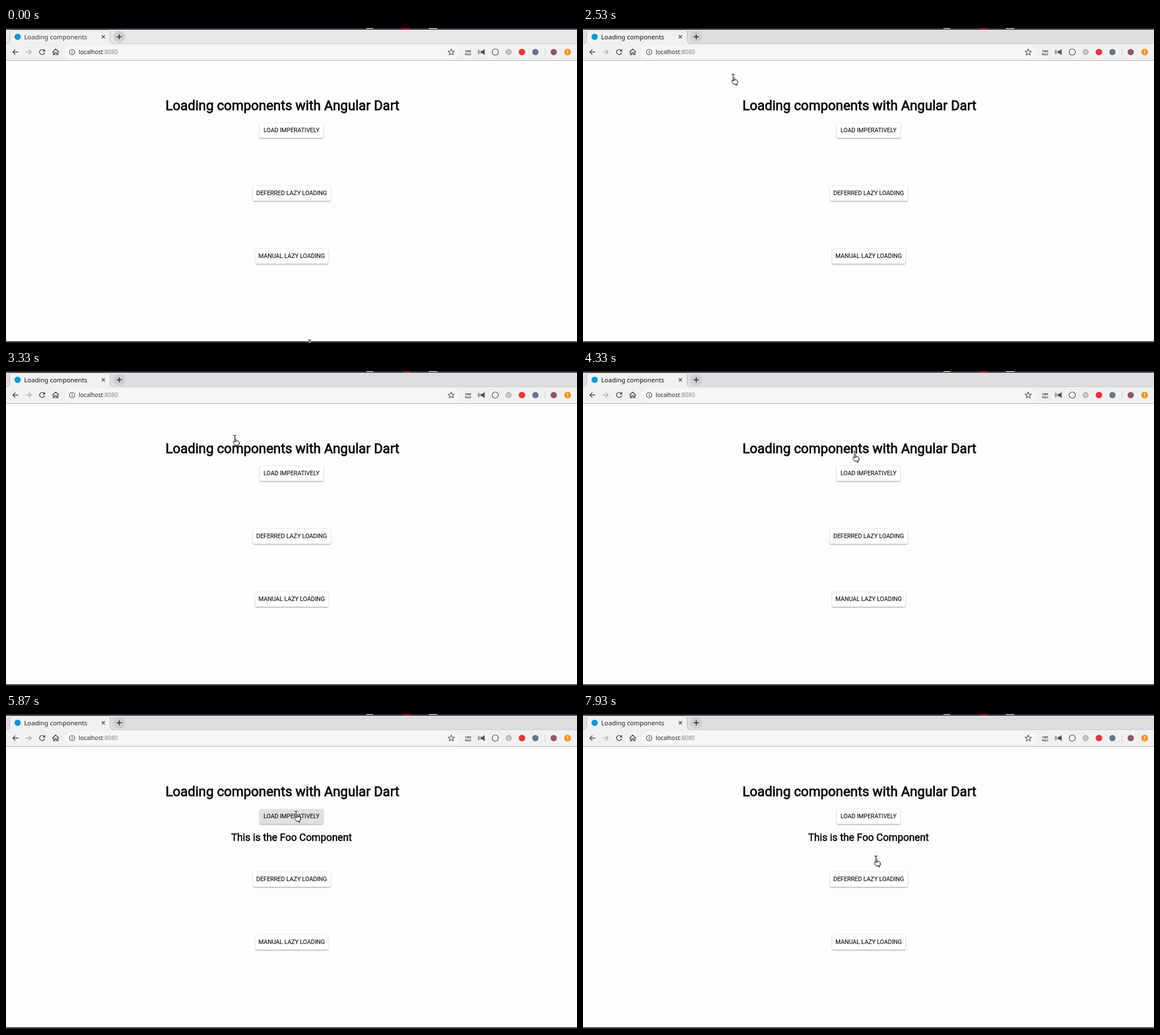
An HTML page that plays this animation: 1006 px wide and 556 px high, repeating every 8 s.

```html
<!DOCTYPE html>
<html lang="en">
<head>
<meta charset="utf-8">
<title>Loading components</title>
<style>
  html, body { margin: 0; width: 100%; height: 100%; overflow: hidden; background: #fdfdfc; }
  .stage { position: relative; width: 1006px; height: 556px; overflow: hidden; background: #fdfdfc; }
  svg { position: absolute; left: 0; top: 0; overflow: visible; }
  .ui { font-family: "Noto Sans", "Open Sans", sans-serif; }
  .line { fill: none; stroke: #4a4a4d; stroke-width: 1.4; }

  h1, h2 {
    position: absolute; left: 0; width: 1006px; margin: 0; text-align: center; white-space: nowrap;
    font-family: Roboto, sans-serif; font-weight: 400; color: #0b0b0b;
    -webkit-text-stroke: .8px #0b0b0b;
  }
  h1 { left: -16px; top: 123px; font-size: 23.76px; line-height: 28px; }
  h2 { top: 207px; font-size: 17.82px; line-height: 22px; -webkit-text-stroke-width: .6px; }

  .button {
    position: absolute; height: 26px; line-height: 26.5px; border-radius: 2px;
    text-align: center; white-space: nowrap; background: #fff; color: #141414;
    font: 400 10.5px/26.5px Roboto, sans-serif; -webkit-text-stroke: .15px #141414;
    box-shadow: 0 1.5px 2px rgba(0,0,0,.28), 0 0 2px rgba(70,70,130,.24);
  }

  .strip, .title, .load, .foo, .cursor, .cursor g { animation: 8s linear infinite; }
  .strip { animation-name: strip; }
  .title { animation-name: title; }
  .load { animation-name: press; }
  .foo { animation-name: appear; animation-timing-function: step-end; }
  .cursor { animation-name: travel; }
  .cursor g { animation-timing-function: step-end; }
  .arrow { animation-name: arrow; }
  .hand { animation-name: hand; }
  .beam { animation-name: beam; }

  @keyframes strip { 0%, 1.6% { fill: #e8e6e8; } 5.9%, 100% { fill: #dfdddf; } }
  @keyframes title { 0%, 1.6% { fill: #3a3a3a; } 5.9%, 53.3% { fill: #101010; } 61.6%, 100% { fill: #222; } }

  @keyframes press {
    0%, 59.4% { background: #fff; }
    60.5%, 64.1% { background: #e0e0e0; box-shadow: 0 1.5px 2px rgba(0,0,0,.28), 0 0 2px rgba(70,70,130,.24); }
    66.2%, 68.3% { background: #b9b9b9; box-shadow: 0 3px 5px rgba(0,0,0,.34), 0 1px 3px rgba(0,0,0,.2); }
    70.9%, 76.9% { background: #e0e0e0; box-shadow: 0 1.5px 2px rgba(0,0,0,.28), 0 0 2px rgba(70,70,130,.24); }
    78%, 100% { background: #fff; }
  }
  @keyframes appear { 0% { opacity: 0; } 68.4%, 100% { opacity: 1; } }

  @keyframes travel {
    0%, 1.6% { transform: translate(535px, 556px); }
    5.9%, 10.9% { transform: translate(485px, 380px); }
    15.9%, 19.1% { transform: translate(427px, 131px); }
    20% { transform: translate(440px, 132px); }
    25.9%, 30.8% { transform: translate(262px, 86px); }
    31.6% { transform: translate(264px, 87px); }
    41.6%, 42.5% { transform: translate(403px, 119px); }
    52.5%, 53.4% { transform: translate(475px, 144px); }
    61.6%, 73.4% { transform: translate(511px, 177px); }
    82.5%, 84.1% { transform: translate(492px, 222px); }
    93.4%, 95% { transform: translate(501px, 221px); }
    99.1%, 100% { transform: translate(516px, 256px); }
  }
  @keyframes arrow {
    0% { opacity: 0; } 1.63% { opacity: 1; } 44.5% { opacity: 0; }
    55.4% { opacity: 1; } 59.4% { opacity: 0; }
    77% { opacity: 1; } 79.8% { opacity: 0; } 96.3%, 100% { opacity: 1; }
  }
  @keyframes hand { 0% { opacity: 0; } 59.4% { opacity: 1; } 77%, 100% { opacity: 0; } }
  @keyframes beam {
    0% { opacity: 0; } 44.5% { opacity: 1; } 55.4% { opacity: 0; }
    79.8% { opacity: 1; } 96.3%, 100% { opacity: 0; }
  }
</style>
</head>
<body>
<div class="stage">
  <svg class="ui" width="1006" height="556">
    <!-- desktop edges -->
    <path d="M0 0H1006V3H0zM0 553H1006V556H0z" fill="#302d38"/>
    <path d="M635 0h12v1.5h-12zM745 0h15v1.5h-15z" fill="#d5d4d8"/>
    <path d="M699 0h13v2h-13z" fill="#c5103c"/>

    <!-- tab strip and toolbar -->
    <rect class="strip" y="3" width="1006" height="25"/>
    <rect y="27.5" width="1006" height="30" fill="#f1f0f1"/>
    <path d="M0 27.5H1006" stroke="#c6c4c6"/>
    <path d="M0 57.5H1006" stroke="#b9b7b9"/>
    <path d="M0 28.5Q6.500 27.500 6.500 22V8Q6.500 3.500 11 3.500H178.500Q183.500 3.500 183.500 8V22Q183.500 27.500 190 28.500z" fill="#f1f0f1"/>
    <path d="M0 27.500Q6.500 27.500 6.500 22V8Q6.500 3.500 11 3.500H178.500Q183.500 3.500 183.500 8V22Q183.500 27.500 190 27.500" fill="none" stroke="#bcbabc"/>
    <circle cx="20.500" cy="15.500" r="5.500" fill="#1296d0"/>
    <text class="title" x="32" y="19.700" font-size="11.200">Loading components</text>
    <path class="line" d="M168.800 12.800l5.400 5.400m0-5.400l-5.400 5.400"/>
    <circle cx="199.500" cy="15.500" r="10.300" fill="#d0cdd0"/>
    <path class="line" d="M195 15.500h9m-4.500-4.500v9" style="stroke:#222"/>

    <!-- navigation -->
    <rect x="103" y="31" width="695" height="23" rx="11.500" fill="#f7f6f7"/>
    <path class="line" d="M21.500 42.500H12m4.500-4.500L12 42.500l4.500 4.500"/>
    <path class="line" d="M35 42.500h9.500m-4.500-4.500l4.500 4.500l-4.500 4.500" style="stroke:#b0aeb0"/>
    <path class="line" d="M67.500 40A4.500 4.500 0 1 0 68 43.500"/>
    <path d="M69 36.800v4.700h-4.700z" fill="#4a4a4d"/>
    <path class="line" d="M81.800 42.500L87.500 37.300L93.200 42.500M83.500 41.500V47H86V43.500H89V47H91.500V41.500"/>
    <circle class="line" cx="116.500" cy="42.500" r="4.700" style="stroke-width:1.100"/>
    <path class="line" d="M116.500 41.800v3.200m0-5.400v1.200" style="stroke-width:1.200"/>
    <text x="128" y="46" font-size="10.200" fill="#262626">localhost<tspan fill="#808084">:8080</tspan></text>

    <!-- extensions -->
    <path class="line" style="stroke-width:1.100" d="M784.500 37.200l1.500 3.600l3.900.3l-3 2.500l1 3.800l-3.400-2.100l-3.400 2.100l1-3.800l-3-2.500l3.900-.3z"/>
    <g font-size="4.800" font-weight="700" text-anchor="middle" fill="#444">
      <text x="814" y="42.500">1480</text><text x="814" y="48">days</text>
    </g>
    <path d="M836.500 40.300h2.800l4-3.300v11l-4-3.300h-2.800z" fill="#505054"/>
    <path class="line" d="M834.800 39.800q-1.500 2.700 0 5.400m-2-6.800q-2 4 0 8.200" style="stroke-width:1"/>
    <circle class="line" cx="862" cy="42.500" r="5.500" style="stroke-width:1.200"/>
    <circle cx="885.500" cy="42.500" r="4.600" fill="#c9c9cb" stroke="#88888b"/>
    <circle cx="909" cy="42.500" r="5.800" fill="#e0383d"/>
    <circle cx="932.700" cy="42.500" r="5.500" fill="#637889"/>
    <path d="M949.500 36V49" stroke="#cfcdcf"/>
    <circle cx="965" cy="42.500" r="5.500" fill="#8d5960"/>
    <circle cx="989.500" cy="42.500" r="6" fill="#f59322"/>
    <path d="M989.500 39v4.300m0 1.400v1.400" stroke="#fff" stroke-width="1.400"/>
  </svg>

  <h1>Loading components with Angular Dart</h1>
  <div class="button load" style="left:447px;top:168px;width:112px">LOAD IMPERATIVELY</div>
  <h2 class="foo">This is the Foo Component</h2>
  <div class="button" style="left:435px;top:279px;width:136.500px">DEFERRED LAZY LOADING</div>
  <div class="button" style="left:438.500px;top:389.500px;width:129.500px">MANUAL LAZY LOADING</div>

  <svg class="cursor" width="20" height="20" stroke="#16161c" fill="#fff">
    <g class="arrow">
      <path d="M.500 .500V12.300L3.200 9.900L5.200 14.500L7 13.700L5.100 9.200H8.700z" stroke-linejoin="round"/>
    </g>
    <g class="hand">
      <path d="M0 7V1Q0-.700 1-.700T2 1V4.200Q7.700 4 7.700 6V9Q7.700 10 6.800 12H.500L-2.600 7.800Q-3.400 6.400-2 6.200z" stroke-linejoin="round"/>
    </g>
    <g class="beam" fill="none">
      <path d="M-3-5.500Q0-5.500 0-4.500Q0-5.500 3-5.500M0-4.500V4.500M-3 5.500Q0 5.500 0 4.500Q0 5.500 3 5.500" stroke="#fff" stroke-width="2.600"/>
      <path d="M-3-5.500Q0-5.500 0-4.500Q0-5.500 3-5.500M0-4.500V4.500M-3 5.500Q0 5.500 0 4.500Q0 5.500 3 5.500" stroke-width="1.200"/>
    </g>
  </svg>
</div>
</body>
</html>
```
